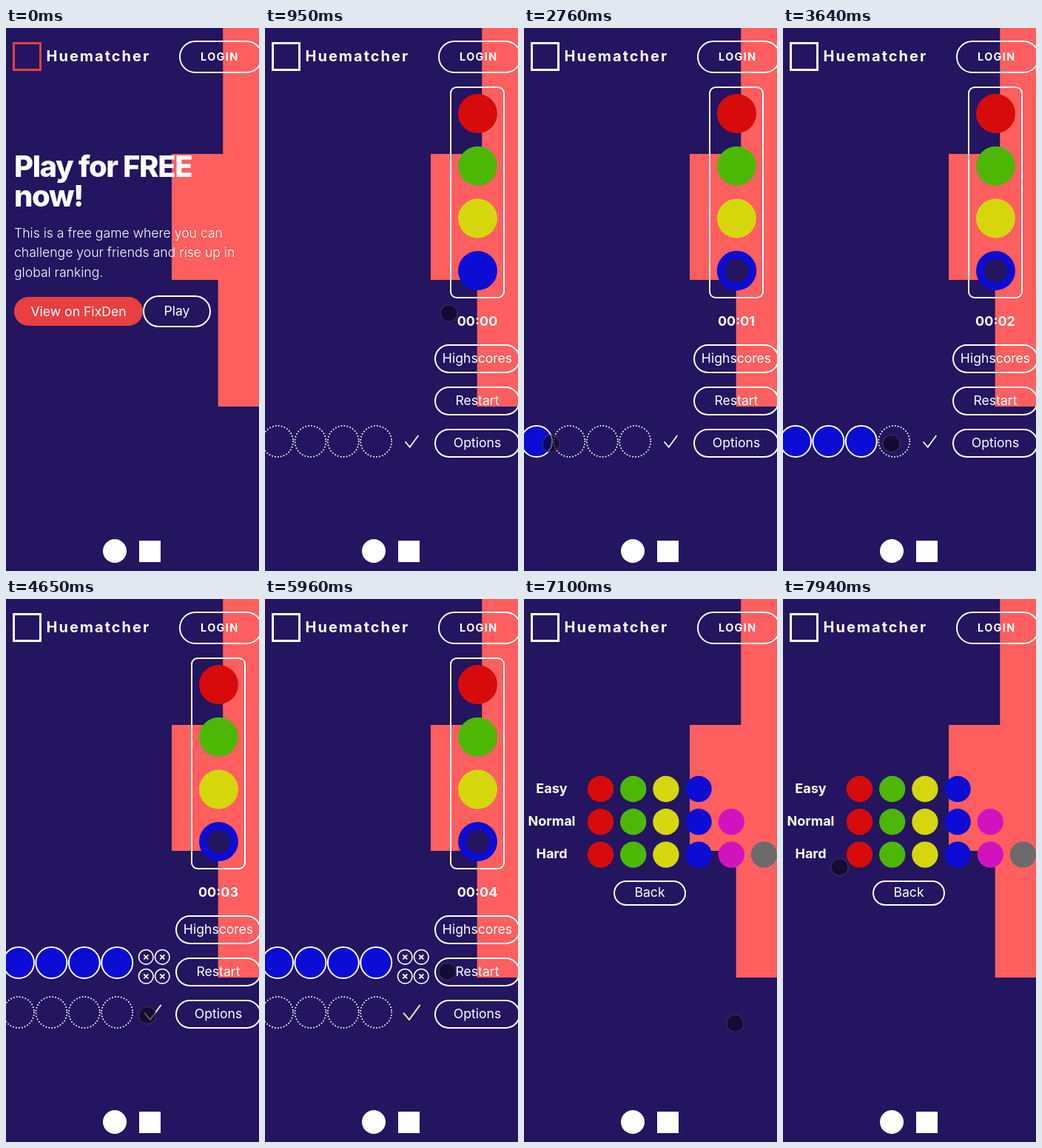
An HTML page with a canvas for the animation above (8000 ms loop, 342 by 733 pixels).

```html
<!DOCTYPE html>
<html lang="en">
<head>
<meta charset="utf-8">
<title>Huematcher</title>
<style>
html, body { margin: 0; width: 100%; height: 100%; overflow: hidden; background: #231560; }
canvas { display: block; width: 342px; height: 733px; }
</style>
</head>
<body>
<canvas id="stage"></canvas>
<script>
const W = 342, H = 733, LOOP = 8000;
const BG = '#231560', CORAL = '#ff5f5f', RED = '#e93f3f', WHITE = '#fff', BLUE = '#0c0cd4';
const COLORS = ['#d70b0b', '#4db706', '#d6d60c', BLUE, '#d213bd', '#6b6b6b'];
const OPEN_GAME = 880, PICK = 1690, SUBMIT = 4350, OPEN_OPTIONS = 6830;
const SLOTS = [0, 1, 2, 3];
const slotX = i => 17 + 44.4 * i;
const fillTime = i => 2620 + 400 * i;

// Pointer moves: start, end, target x, target y
const MOVES = [
  [70, 810, 248.5, 385],
  [950, 1610, 287, 329],
  [1690, 1960, 133.5, 559],
  [1960, 2490, slotX(0), 561],
  ...SLOTS.slice(1).map(i => [fillTime(i) - 360, fillTime(i) - 140, slotX(i), 561]),
  [3840, 4110, 191, 562],
  [5140, 5380, 192, 648],
  [5600, 5960, 246.5, 503],
  [5960, 6600, 285.5, 573],
  [7100, 7600, 181, 421],
  [7640, 7940, 76.5, 362]
];

const canvas = document.getElementById('stage');
const ctx = canvas.getContext('2d');
const dpr = window.devicePixelRatio || 1;
canvas.width = W * dpr;
canvas.height = H * dpr;

const clamp = v => Math.max(0, Math.min(1, v));
const smooth = v => { v = clamp(v); return v * v * (3 - 2 * v); };
const mix = (a, b, k) => a + (b - a) * k;

function disc(x, y, r, color) {
  ctx.beginPath();
  ctx.arc(x, y, r, 0, Math.PI * 2);
  ctx.fillStyle = color;
  ctx.fill();
}

function ring(x, y, r, width, color = WHITE) {
  ctx.beginPath();
  ctx.arc(x, y, r, 0, Math.PI * 2);
  ctx.lineWidth = width;
  ctx.strokeStyle = color;
  ctx.stroke();
}

function line(points, width, color = WHITE) {
  ctx.beginPath();
  points.forEach(p => ctx.lineTo(p[0], p[1]));
  ctx.lineWidth = width;
  ctx.strokeStyle = color;
  ctx.stroke();
}

function text(str, x, y, size, weight = 400, align = 'left', spacing = 0) {
  ctx.font = `${weight} ${size}px Inter, sans-serif`;
  ctx.letterSpacing = spacing + 'px';
  ctx.textAlign = align;
  ctx.fillStyle = WHITE;
  ctx.fillText(str, x, Math.floor(y));
}

// Outer bounds of a box with a 2px inner border
function outline(x, y, w, h, r) {
  ctx.beginPath();
  ctx.roundRect(x + 1, y + 1, w - 2, h - 2, r - 1);
  ctx.lineWidth = 2;
  ctx.strokeStyle = WHITE;
  ctx.stroke();
}

function button(label, x, y, w, h) {
  outline(x, y, w, h, h / 2);
  text(label, x + w / 2, y + h / 2 + 5.5, 17.6, 400, 'center');
}

function backdrop() {
  ctx.fillStyle = BG;
  ctx.fillRect(0, 0, W, H);
  ctx.fillStyle = CORAL;
  [293.3, 224, 286.7].forEach((x, i) => {
    const top = Math.max(0, Math.round(170.5 * i - 1));
    ctx.fillRect(x, top, W - x, Math.round(170.5 * (i + 1) - 1) - top);
  });
}

function header(t) {
  ctx.lineWidth = 3;
  ctx.strokeStyle = t < OPEN_GAME ? RED : WHITE;
  ctx.strokeRect(10.5, 20.5, 36, 36);
  text('Huematcher', 54.5, 45, 20, 700, 'left', 2);
  outline(234, 17, 113, 44, 22);
  text('LOGIN', 263, 44, 14.4, 700, 'left', 1.4);
}

function footer() {
  disc(147, 706, 16, WHITE);
  ctx.fillRect(180, 692, 29, 29);
}

function home() {
  ['Play for FREE', 'now!'].forEach((s, i) => text(s, 11, 201 + i * 40, 40, 800, 'left', -1.4));
  ['This is a free game where you can', 'challenge your friends and rise up in', 'global ranking.']
    .forEach((s, i) => text(s, 11, 283 + i * 26.5, 17.6, 350));
  ctx.beginPath();
  ctx.roundRect(11, 363, 174, 39, 19.5);
  ctx.fillStyle = RED;
  ctx.fill();
  text('View on FixDen', 98, 389, 17.6, 400, 'center');
  button('Play', 185, 361, 92, 43);
}

function peg(x, y) {
  disc(x, y, 21, BLUE);
  ring(x, y, 21, 2);
}

function emptySlot(x, y) {
  ctx.lineCap = 'round';
  ctx.setLineDash([0, Math.PI * 42 / 33]);
  ring(x, y, 21, 2);
  ctx.setLineDash([]);
  ctx.lineCap = 'butt';
}

function miss(x, y) {
  ring(x, y, 9.8, 1.6);
  line([[x - 3, y - 3], [x + 3, y + 3]], 1.9);
  line([[x + 3, y - 3], [x - 3, y + 3]], 1.9);
}

function palette(t) {
  outline(250, 79, 74, 286, 9);
  const grow = smooth((t - PICK) / 130) - smooth((t - fillTime(0)) / 200);
  SLOTS.forEach(i => disc(287.5, 115.5 + i * 70.7, 26.5 + (i === 3 ? grow * 1.5 : 0), COLORS[i]));
  if (t >= PICK) disc(287.5, 327.6, 15.8 + grow * 0.8, BG);
}

function checkMark(t) {
  const k = smooth((t - SUBMIT + 60) / 200);
  const s = mix(1, 1.27, k);
  const at = (x, y) => [198.5 + x * s, 558 + y * s];
  const color = `rgb(255,${mix(255, 224, k)},${mix(255, 184, k)})`;
  line([at(-9, 0.5), at(-2.8, 7.8), at(8.8, -8)], mix(1.7, 2, k), color);
}

function game(t) {
  palette(t);
  const sec = Math.max(0, Math.floor((t - 1620) / 1000));
  text('00:' + String(sec).padStart(2, '0'), 287, 402, 18, 700, 'center');
  ['Highscores', 'Restart', 'Options'].forEach((s, i) => button(s, 229, 427 + i * 57, 116, 39));

  const sent = t >= SUBMIT;
  for (const i of SLOTS) {
    const x = slotX(i);
    if (!sent && t >= fillTime(i)) peg(x, 558);
    else emptySlot(x, 558);
    if (sent) {
      peg(x, 491);
      miss(189.3 + 22 * (i % 2), 483.3 + 26 * (i >> 1));
    }
  }
  checkMark(t);
}

function options() {
  ['Easy', 'Normal', 'Hard'].forEach((label, row) => {
    const y = 256.5 + row * 44.3;
    text(label, 37.5, y + 5.6, 18, 700, 'center');
    for (let i = 0; i < 4 + row; i++) disc(103.5 + i * 44.2, y, 17.7, COLORS[i]);
  });
  button('Back', 121, 380, 98, 34);
}

function pointer(t) {
  let x = 317, y = 746;
  for (const [from, to, tx, ty] of MOVES) {
    const k = smooth((t - from) / (to - from));
    x = mix(x, tx, k);
    y = mix(y, ty, k);
  }
  disc(x, y, 12, 'rgba(10,5,28,0.62)');
  ring(x, y, 11.6, 1.8, 'rgba(85,78,112,0.42)');
}

function draw(t) {
  ctx.setTransform(dpr, 0, 0, dpr, 0, 0);
  backdrop();
  header(t);
  footer();
  if (t < OPEN_GAME) {
    home();
  } else {
    const k = smooth((t - OPEN_OPTIONS) / 200);
    if (k < 1) { ctx.globalAlpha = 1 - k; game(t); }
    if (k > 0) { ctx.globalAlpha = k; options(); }
    ctx.globalAlpha = 1;
  }
  pointer(t);
}

const start = performance.now();
function tick() {
  draw((performance.now() - start) % LOOP);
  requestAnimationFrame(tick);
}
tick();
</script>
</body>
</html>
```
